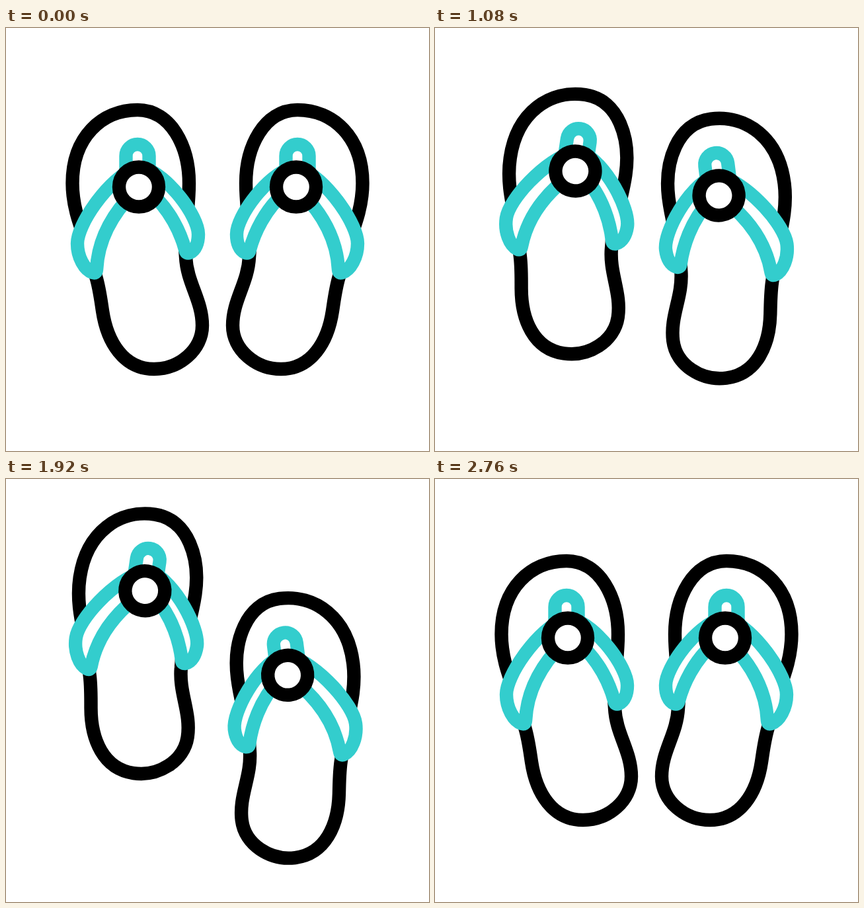
An HTML page for the animation above (2800 ms loop, 640 px wide and 640 px high).

```html
<!DOCTYPE html>
<html>
<head>
<meta charset="utf-8">
<style>
  html, body { margin: 0; width: 100%; height: 100%; overflow: hidden; background: #fff; }
  svg { display: block; width: 100%; height: 100%; }
  .ink { stroke: #000; }
  .strap { stroke: #33cdcd; }
</style>
</head>
<body>
<svg viewBox="0 0 640 640">
  <defs>
    <g id="sandal" fill="#fff" stroke-width="20.4" stroke-linejoin="round">
      <path class="ink" d="M199 124C250 124 277 180 277 235C277 280 268 305 272 347C274 386 297 412 297 450
        C297 487 262 516 224 516C178 516 153 475 146 428C143 408 141 392 136 376
        C129 330 100.5 290 100.5 235C100.5 165 145 124 199 124Z"/>
      <path class="strap" d="M195 211C150 234 108 298 108 326C108 347 119 366 131 370Q136.5 372 137 366
        C139 322 159 282 197 245Z"/>
      <path class="strap" d="M207 211C245 222 291 285 291 312C291 325 287 336 278 340Q273 342 271.5 337
        C265 312 249 274 214 245Z"/>
      <path class="strap" d="M181.5 225V193.5a17.5 17.5 0 0 1 35 0V225"/>
      <circle class="ink" cx="201" cy="240.5" r="30"/>
    </g>
  </defs>
  <use id="left" href="#sandal"/>
  <g transform="matrix(-1 0 0 1 640 0)"><use id="right" href="#sandal"/></g>
</svg>
<script>
const LOOP = 2800, STEP = 40;
const left = document.getElementById('left');
const right = document.getElementById('right');

// Eased value at time t through [time, value] keys.
function tween(t, keys) {
  if (t <= keys[0][0]) return keys[0][1];
  for (let i = 1; i < keys.length; i++) {
    const [t0, a] = keys[i - 1], [t1, b] = keys[i];
    if (t < t1) {
      const p = (t - t0) / (t1 - t0);
      return a + (b - a) * p * p * (3 - 2 * p);
    }
  }
  return keys[keys.length - 1][1];
}

const stride = (t, out, back) =>
  tween(t, [[200, 0], [800, out], [1400, back], [2000, out], [2600, 0]]);

function pose(foot, y, drift, angle, pivotY) {
  foot.setAttribute('transform', `translate(${y * drift} ${y}) rotate(${angle} 201 ${pivotY})`);
}

function draw(now) {
  const t = Math.floor(now % LOOP / STEP) * STEP;
  const turn = tween(t, [[260, 0], [890, 1], [2060, 1], [2720, 0]]);
  pose(left, stride(t, -78, 40), 0.044, 8.4 * turn, 326);
  pose(right, stride(t, 61, -47), 0.078, 7.1 * turn, 309);
}

function loop() {
  draw(performance.now());
  requestAnimationFrame(loop);
}
loop();
</script>
</body>
</html>
```
